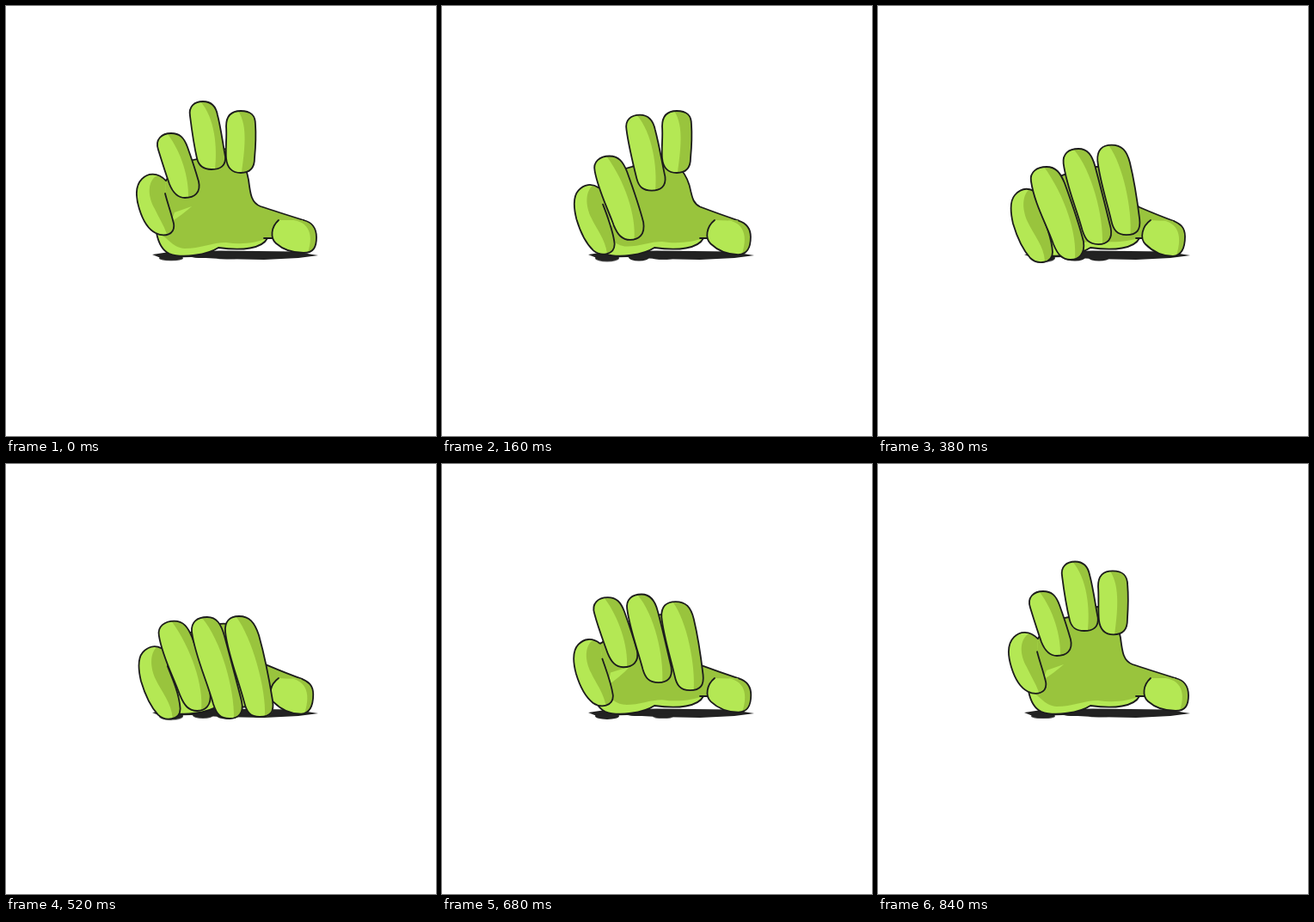
Animation, 500 px wide and 500 px high, one loop 0.86 s. Source, as an HTML page without scripts:

```html
<!DOCTYPE html>
<html lang="en">
<head>
<meta charset="utf-8">
<title>Drumming fingers</title>
<style>
html, body { margin: 0; width: 100%; height: 100%; overflow: hidden; background: #fff; }
svg { display: block; width: 100vw; height: 100vh; }

/* --o / --c: open and closed outline; --so / --sc: the same for the second tone */
path { d: var(--o); animation: var(--move) 860ms cubic-bezier(.3, .15, .7, .85) infinite; }
.fill { fill: #b4e854; }
.dark { fill: #99c43d; }
.tone { --o: var(--so); --c: var(--sc); }
.line { fill: none; stroke: #1c1c1c; stroke-width: 1.8; stroke-linejoin: round; stroke-linecap: round; }
.still { animation: none; }
.shadow { fill: #222; }
.shadow ellipse { transform-box: fill-box; transform-origin: center; animation: var(--move) 860ms linear infinite; }

#palm {
  --move: palm;
  --o: path("M176 210L186 203C195 188 208 180 222 178C235 172 245 166 256 166C270 168 279 185 282 202C284 218 285 229 296 233C314 239 330 244 346 249L340 270H300H304C298 282 275 285 247 281C235 289 205 294 190 288C181 284 177 274 175 264");
  --c: path("M176 217L187 213C197 207 207 198 220 195C232 190 245 186 256 187C275 190 292 205 296 228C298 230 300 231 304 234C318 240 330 245 344 250L340 270H300H304C298 282 275 285 247 281C235 289 205 294 190 288C181 284 177 274 175 264");
  --so: path("M175 264C188 267 192 281 208 282C226 282 240 275 256 275C275 278 292 275 304 270C298 282 275 285 247 281C235 289 205 294 190 288C181 284 177 274 175 264ZM216 233L196 240L192 251C200 246 208 240 216 233Z");
  --sc: path("M175 264C200 262 204 274 216 277C230 279 242 273 256 273C275 276 292 273 304 270C298 282 275 285 247 281C235 289 205 294 190 288C181 284 177 274 175 264ZM222 239L196 246L194 267C202 258 214 250 222 239Z");
}
#thumb {
  --move: palm;
  --o: path("M317 249C308 257 307 270 314 276C323 284 335 287 346 287C358 287 361 280 361 269C361 256 354 251 346 249");
  --c: path("M317 249C307 256 304 270 311 277C321 287 333 291 343 291C353 290 357 282 357 268C357 257 351 253 344 250");
  --so: path("M317 249C348 245 360 260 351 287C358 286 361 280 361 269C361 256 354 251 346 249Z");
  --sc: path("M317 249C346 246 356 262 347 290C354 289 357 282 357 268C357 257 351 253 344 250Z");
}
#pinky {
  --move: pinky;
  --o: path("M186 203C176 193 165 194 158 201C150 209 151 223 155 236C159 249 166 260 174 264C184 269 197 266 195 253C192 240 188 230 185 218");
  --c: path("M181 215C173 211 165 213 159 220C153 227 154 240 157 253C162 270 169 284 177 293C185 301 203 300 203 286C202 270 195 253 188 236");
  --so: path("M186 203C182 198 178 197 174 198C164 206 165 222 173 236C177 245 183 254 187 265C192 263 196 259 195 253C192 240 188 230 185 218Z");
  --sc: path("M181 215C179 214 177 214 175 214C167 222 168 238 174 251C181 266 193 279 194 297C200 296 203 292 203 286C202 270 195 253 188 236Z");
}
#ring {
  --move: ring;
  --o: path("M177 167C173 155 181 148 192 148C202 148 207 153 211 164C216 178 220 190 224 204C227 217 219 223 208 223C199 223 194 217 190 207C185 193 181 180 177 167Z");
  --c: path("M178 204C176 193 185 187 196 187C207 187 212 194 217 206C225 228 233 250 239 274C241 289 233 295 224 295C214 295 209 289 204 277C195 252 182 230 178 204Z");
  --so: path("M188 149C202 146 207 153 211 164C216 178 220 190 224 204C227 216 220 222 212 223C213 200 204 170 188 149Z");
  --sc: path("M193 187C207 186 212 194 217 206C225 228 233 250 239 274C241 287 235 294 229 294C232 265 217 220 193 187Z");
}
#middle {
  --move: middle;
  --o: path("M214 128C212 117 219 111 229 111C238 111 244 116 246 127C250 142 252 160 255 175C256 186 249 190 239 190C229 190 224 186 222 177C218 160 216 144 214 128Z");
  --c: path("M216 195C215 184 222 178 234 178C245 178 250 186 254 200C261 226 268 252 274 276C277 290 270 296 260 296C249 296 245 291 241 279C233 250 220 224 216 195Z");
  --so: path("M226 111C238 111 244 116 246 127C250 142 252 160 255 175C256 185 251 189 243 190C246 165 243 130 226 111Z");
  --sc: path("M228 179C245 176 250 186 254 200C261 226 268 252 274 276C277 289 271 295 265 296C266 262 250 205 228 179Z");
}
#index {
  --move: index;
  --o: path("M256 140C256 127 262 122 273 122C285 122 290 127 290 138C291 152 290 166 289 177C289 188 284 194 273 194C262 194 257 187 256 177C255 165 257 152 256 140Z");
  --c: path("M255 195C254 183 260 177 271 177C283 177 289 184 294 199C301 224 306 250 310 275C312 288 308 294 295 294C284 294 280 289 277 277C270 250 258 222 255 195Z");
  --so: path("M270 122C285 122 290 127 290 138C291 152 290 166 289 177C289 188 284 193 274 194C277 170 282 140 270 122Z");
  --sc: path("M268 178C283 176 289 184 294 199C301 224 306 250 310 275C312 287 309 293 301 294C303 262 286 202 268 178Z");
}

@keyframes palm { 0%, 97%, 100% { d: var(--o); } 36%, 57% { d: var(--c); } }
@keyframes pinky { 0%, 99%, 100% { d: var(--o); } 28%, 57.5% { d: var(--c); } }
@keyframes ring { 0%, 1.5%, 86%, 100% { d: var(--o); } 28%, 56% { d: var(--c); } }
@keyframes middle { 0%, 5%, 100% { d: var(--o); } 55.5%, 64.5% { d: var(--c); } }
@keyframes index { 0%, 22%, 100% { d: var(--o); } 54.5%, 68.5% { d: var(--c); } }

@keyframes pinky-shadow { 0%, 100% { transform: scaleY(.8); } 28%, 57% { transform: scaleY(1.2); } }
@keyframes ring-shadow { 0%, 75%, 100% { transform: scaleY(.2); } 18%, 57% { transform: scaleY(1); } }
@keyframes middle-shadow { 0%, 12%, 95%, 100% { transform: scaleY(.4); } 40%, 75% { transform: scaleY(1); } }
</style>
</head>
<body>
<svg viewBox="0 0 500 500">
  <g class="shadow">
    <path class="still" style="--o: path('M170 289L190 286L250 284.5L335 285.5L363 290L340 293L300 295L250 294L215 292L180 293Z')"/>
    <ellipse style="--move: pinky-shadow" cx="192" cy="293" rx="14" ry="4"/>
    <ellipse style="--move: ring-shadow" cx="229" cy="292" rx="12" ry="4.5"/>
    <ellipse style="--move: middle-shadow" cx="257" cy="293" rx="12" ry="3.5"/>
  </g>
  <g id="palm"><path class="dark"/><path class="tone fill"/><path class="line"/></g>
  <g id="thumb"><path class="fill"/><path class="tone dark"/><path class="line"/></g>
  <g id="pinky"><path class="fill"/><path class="tone dark"/><path class="line"/></g>
  <g id="ring"><path class="fill"/><path class="tone dark"/><path class="line"/></g>
  <g id="middle"><path class="fill"/><path class="tone dark"/><path class="line"/></g>
  <g id="index"><path class="fill"/><path class="tone dark"/><path class="line"/></g>
</svg>
</body>
</html>
```
